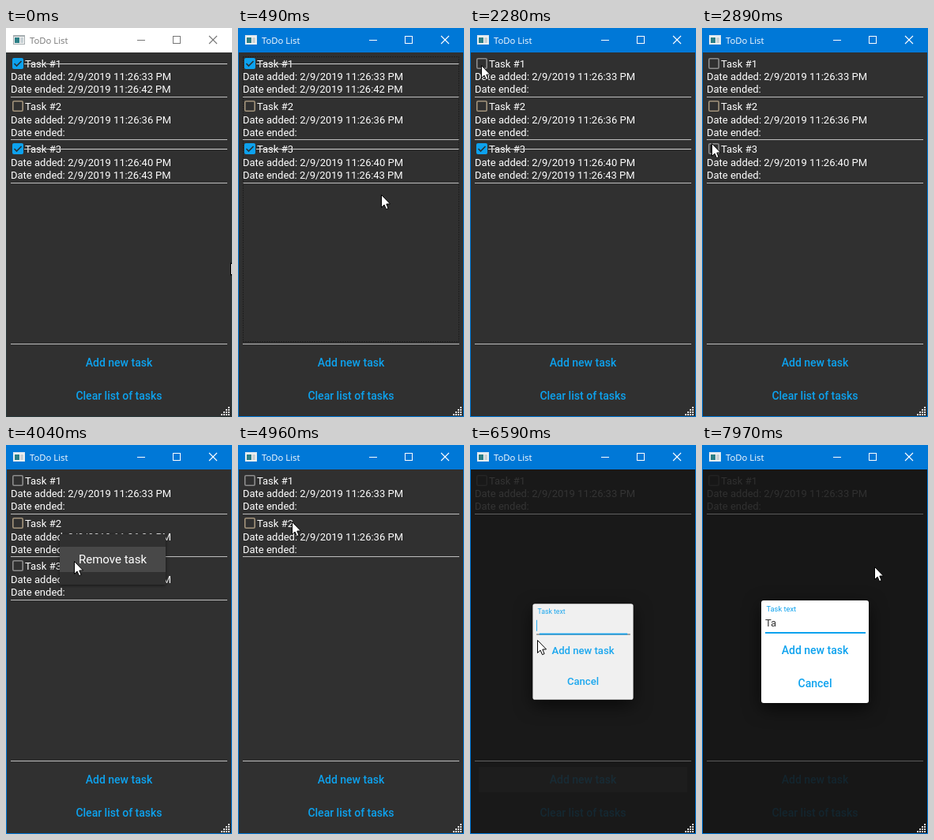
Recreate the animation shown at these times as an HTML page with a canvas. Size 286 by 493 pixels, loop 8 s.

```html
<!DOCTYPE html>
<html lang="en">
<head>
<meta charset="utf-8">
<title>ToDo List</title>
<style>
  html, body { margin: 0; width: 100%; height: 100%; overflow: hidden; background: #303030; }
  canvas { display: block; }
</style>
</head>
<body>
<canvas id="stage" width="286" height="493"></canvas>
<script>
const ctx = document.getElementById('stage').getContext('2d');
const LOOP = 8000;
const BLUE = '#0da2ee', BODY = '#303030', LINE = '#bdbdbd';
const ROBOTO = 'Roboto, sans-serif';

// Moments of the story, in ms
const ACTIVATE = 400, PRESS = 6250, DISABLE = 6350, DIALOG = 6360, TYPE_T = 7510, TYPE_A = 7970;

const tasks = [
  { name: 'Task #1', added: '33', ended: '42', uncheck: 1260, remove: LOOP, box: '#8c8c8c' },
  { name: 'Task #2', added: '36', ended: '', uncheck: 0, remove: 5330, box: '#a3947c' },
  { name: 'Task #3', added: '40', ended: '43', uncheck: 2890, remove: 4300, box: '#8c8c8c' },
];

const menus = [
  { x: 68, y: 113, open: 3710, hover: 3960, close: 4270 },
  { x: 56, y: 80, open: 5000, hover: 5190, close: 5300 },
];

// Pointer path: time, x, y
const path = [
  [60, 284, 297], [400, 200, 230], [850, 17, 54], [1180, 18, 53], [1740, 17, 54], [1770, 14, 47],
  [2280, 14, 47], [2450, 26, 90], [2620, 12, 161], [2710, 12, 146], [2990, 12, 146],
  [3200, 55, 188], [3380, 78, 112], [3530, 72, 130], [3710, 72, 130], [4040, 86, 147],
  [4780, 86, 147], [5000, 66, 92], [5130, 66, 92], [5290, 72, 114], [5620, 72, 114],
  [5980, 131, 393], [6200, 137, 418], [6380, 137, 418], [6590, 85, 247], [6900, 94, 228],
  [7230, 125, 284], [7280, 125, 284], [7510, 218, 154],
];

const progress = (t, start, length) => Math.min(1, Math.max(0, (t - start) / length));
const sineOut = p => Math.sin(p * Math.PI / 2);

function rect(x, y, w, h, color) {
  ctx.fillStyle = color;
  ctx.fillRect(x, y, w, h);
}

function roundRect(x, y, w, h, r, color) {
  ctx.beginPath();
  ctx.roundRect(x, y, w, h, r);
  ctx.fillStyle = color;
  ctx.fill();
}

function text(str, x, y, font, color, align = 'left') {
  ctx.font = font;
  ctx.fillStyle = color;
  ctx.textAlign = align;
  ctx.fillText(str, x, y);
}

function polyline(points, color, width) {
  ctx.beginPath();
  points.forEach(([x, y]) => ctx.lineTo(x, y));
  ctx.strokeStyle = color;
  ctx.lineWidth = width;
  ctx.stroke();
}

// Draws in a saved state with its own opacity
function layer(alpha, draw) {
  ctx.save();
  ctx.globalAlpha *= alpha;
  draw();
  ctx.restore();
}

function shadow(blur, dy, alpha) {
  ctx.shadowColor = `rgba(0,0,0,${alpha})`;
  ctx.shadowBlur = blur;
  ctx.shadowOffsetY = dy;
}

const button = (label, y) => text(label, 143, y, `500 14px ${ROBOTO}`, BLUE, 'center');

function drawTitleBar(active) {
  const ink = active ? '#fff' : '#777';
  rect(0, 0, 286, 31, active ? '#0078d7' : '#fff');
  rect(9, 9, 15, 12, active ? '#dfe8ee' : '#a5adb0');
  rect(10, 11, 13, 9, '#f4f4f4');
  rect(11, 12, 6, 7, '#2c7f86');
  rect(18, 12, 4, 7, '#c9d2d6');
  text('ToDo List', 30, 20, '11.3px "Open Sans", sans-serif', ink);
  rect(166, 15, 10, 1, ink);
  ctx.strokeStyle = ink;
  ctx.lineWidth = 1;
  ctx.strokeRect(211.5, 10.5, 9, 9);
  polyline([[257, 10], [267, 20]], ink, 1.1);
  polyline([[267, 10], [257, 20]], ink, 1.1);
}

function drawTask(task, i, t, alpha) {
  const top = 54 * i, dates = Math.ceil(54.5 * i), font = `13px ${ROBOTO}`;
  const checked = t < task.uncheck;
  const stamp = s => `2/9/2019 11:26:${s} PM`;
  layer(alpha, () => {
    if (checked) {
      roundRect(8, top + 38, 14, 14, 2, BLUE);
      polyline([[10.5, top + 45], [13.5, top + 48], [19.5, top + 42]], '#263238', 1.6);
    } else {
      ctx.beginPath();
      ctx.roundRect(8.8, top + 38.8, 12.4, 12.4, 1.5);
      ctx.strokeStyle = task.box;
      ctx.lineWidth = 1.6;
      ctx.stroke();
    }
    text(task.name, 24, top + 50, font, '#fff');
    if (checked) rect(23, top + 45, 257, 1, '#d0d0d0');
    text('Date added: ' + stamp(task.added), 6, dates + 66, font, '#fff');
    text('Date ended: ' + (checked ? stamp(task.ended) : ''), 6, dates + 82, font, '#fff');
  });
  rect(6, 87 + Math.floor(54.5 * i), 274, 1, LINE);
}

function drawFocus() {
  ctx.save();
  ctx.setLineDash([1, 2]);
  ctx.strokeStyle = '#0c0c0c';
  ctx.lineWidth = 1;
  ctx.strokeRect(6.5, 36.5, 273, 361);
  ctx.restore();
}

function drawMenu({ x, y, open, hover, close }, t) {
  if (t < open || t > close + 160) return;
  const grow = sineOut(progress(t, open, 160));
  layer(grow * (1 - progress(t, close, 160)), () => {
    ctx.save();
    shadow(4, 1, 0.6);
    rect(x, y, 134, 64 * grow, BODY);
    ctx.restore();
    ctx.beginPath();
    ctx.rect(x, y, 134, 64 * grow);
    ctx.clip();
    if (t >= hover) rect(x, y + 16, 134, 32, '#484848');
    text('Remove task', x + 24, y + 37, `15px ${ROBOTO}`, '#fff');
  });
}

function drawDialog(t) {
  const scale = sineOut(progress(t, DIALOG, 300));
  if (!scale) return;
  rect(1, 31, 284, 461, `rgba(0,0,0,${0.52 * scale})`);
  layer(scale, () => {
    ctx.translate(143, 262);
    ctx.scale(scale, scale);
    ctx.translate(-143, -262);
    ctx.save();
    shadow(22, 7, 0.65);
    roundRect(75, 197, 136, 130, 3, '#fff');
    ctx.restore();
    text('Task text', 81.5, 211, `9.3px ${ROBOTO}`, BLUE);
    rect(80, 238, 127, 1, '#444');
    const half = 63.5 * progress(t, 6380, 225);
    rect(143.5 - half, 237, 2 * half, 2, BLUE);
    if (t < TYPE_T) rect(80, 219, 1, 15, BLUE);
    else text(t < TYPE_A ? 'T' : 'Ta', 80, 230, `13px ${ROBOTO}`, '#333');
    button('Add new task', 265);
    button('Cancel', 307);
  });
}

function drawPointer(t) {
  let i = path.findIndex(key => key[0] > t);
  if (i < 0) i = path.length;
  const a = path[Math.max(0, i - 1)], b = path[Math.min(i, path.length - 1)];
  const p = progress(t, a[0], b[0] - a[0] || 1), ease = p * p * (3 - 2 * p);
  ctx.save();
  ctx.translate(Math.round(a[1] + (b[1] - a[1]) * ease) + 0.5, Math.round(a[2] + (b[2] - a[2]) * ease) + 0.5);
  ctx.beginPath();
  [[0, 0], [0, 16], [3.6, 12.6], [6, 18.2], [8.6, 17.1], [6.3, 11.6], [11, 11.4]].forEach(([x, y]) => ctx.lineTo(x, y));
  ctx.closePath();
  ctx.fillStyle = '#fff';
  ctx.fill();
  ctx.strokeStyle = '#000';
  ctx.lineWidth = 1;
  ctx.stroke();
  ctx.restore();
}

function drawGrip() {
  for (let row = 0; row < 4; row++)
    for (let col = 3 - row; col < 4; col++)
      rect(272 + 3 * col, 480 + 3 * row, 2, 2, '#e4e4e4');
}

function draw(t) {
  const active = t >= ACTIVATE;
  const enabled = t < DISABLE ? 1 : 0.25;
  rect(0, 0, 286, 493, active ? '#0078d7' : '#2a3a3c');
  rect(1, 31, 284, 461, BODY);
  drawTitleBar(active);

  tasks.forEach((task, i) => { if (t < task.remove) drawTask(task, i, t, enabled); });
  if (active && t < tasks[0].uncheck) drawFocus();
  rect(6, 400, 274, 1, LINE);

  if (t >= PRESS) rect(11, 408, 264, 32, `rgba(255,255,255,${0.045 * (1 - progress(t, 6600, 300))})`);
  layer(enabled, () => {
    button('Add new task', 429);
    button('Clear list of tasks', 471);
  });

  menus.forEach(menu => drawMenu(menu, t));
  drawDialog(t);
  drawGrip();
  drawPointer(t);
}

const start = performance.now();
function tick() {
  draw((performance.now() - start) % LOOP);
  requestAnimationFrame(tick);
}
tick();
</script>
</body>
</html>
```
